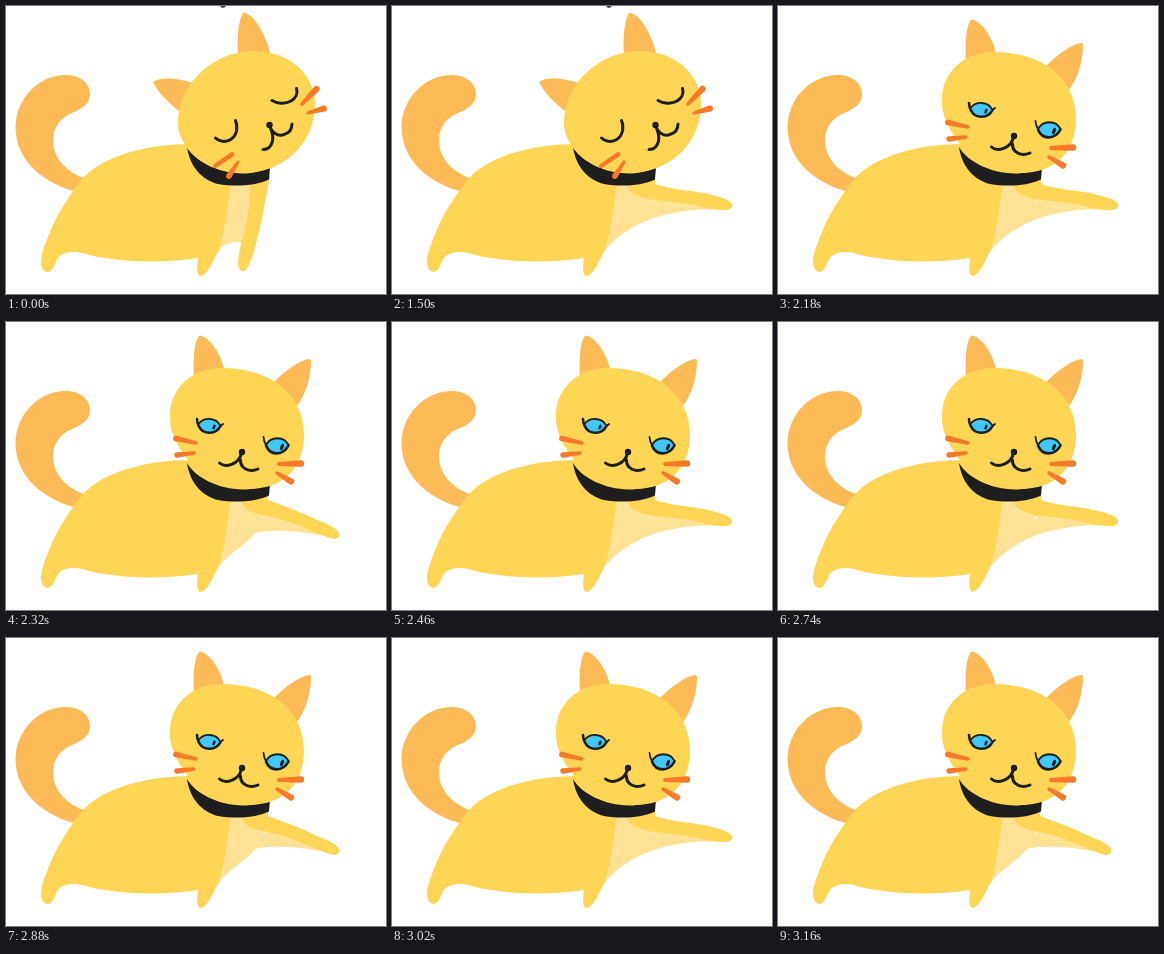
These frames come from a looping animation (380 by 288 pixels, 3.3 s). An HTML page:

```html
<!DOCTYPE html>
<html lang="en">
<head>
<meta charset="utf-8">
<title>Cat waking up</title>
<style>
  html, body { margin: 0; width: 100%; height: 100%; overflow: hidden; background: #fff; }
  svg { display: block; width: 380px; height: 288px; }
  .fur { fill: #ffd556; }
  .ear { fill: #fdbb58; }
  .chest { fill: #ffe296; }
  .ink { fill: #1e1e1e; }
  .line { fill: none; stroke: #1e1e1e; stroke-width: 3; stroke-linecap: round; stroke-linejoin: round; }
  .lid { stroke-width: 1.8; }
  .rim { stroke-width: 2.6; }
  .iris { fill: #3fc8f8; }
  .whisker { fill: #f47a2a; }
  .pose { opacity: 0; }
</style>
</head>
<body>
<svg viewBox="0 0 380 288" xmlns="http://www.w3.org/2000/svg">
  <path class="ear" d="M72 186C40 179 9.5 156 9.5 121C10 92 33 69 60 69C75 69 84 78 84 88C84 98 76 103 66 107C54 112 47 122 47 134C47 152 60 166 80 173Z"/>
  <path class="fur" d="M184 138C148 138.500 102 146 77 172C66 185 52 207 46 221C39 238 35 248 35 256C35 262 38 266 42 266C47 265 49 257 52 252C57 246 66 245 76 247C105 256 155 258 192 252C191 258 190 268 194 270C202 270 208 252 213 244L232 205L262 170V150Z"/>

  <g id="stand" class="pose">
    <path class="chest" d="M225 176C222 196 220 219 212.500 245C217 238 230 233 236 238L250 176Z"/>
    <path class="fur" d="M244 176C244 200 241 219 235 238C233 247 231 257 233 262C235 267 239 266 242 261C250 246 257 208 264 170Z"/>
  </g>
  <g id="high" class="pose">
    <path class="chest" d="M225 176C222 196 220 222 212.500 245C228 226 250 214 276 208C294 204 310 203 330 203L262 180Z"/>
    <path class="fur" d="M235 176C236 186 242 189 256 193C276 196 294 196 314 202C322 204 330 204 335 204C339 203 341 201 340 198C338 193 324 190 312 187C294 184 277 183 263 178V170Z"/>
    <circle cx="258" cy="195.500" r="1" fill="#fff"/>
  </g>
  <g id="low" class="pose">
    <path class="chest" d="M225 176C222 196 220 222 212.500 245C224 230 239 224 249 211C262 207 296 208 323 215L262 180Z"/>
    <path class="fur" d="M235 176C236 186 242 190 256 193C276 196 291 203 306 209C314 212 322 216 328 217C332 217 334 214 333 211C331 206 321 202 311 198C295 190 278 184 262 178V170Z"/>
    <circle cx="258" cy="195.500" r="1" fill="#fff"/>
  </g>

  <path class="ink" d="M181 141C184 161 196 174 212 178C229 181 249 180 263 173.500L264 161.500C256 165 247 167.500 237 167.500C212 167 190 156 181 141Z"/>

  <g id="asleep" class="pose">
    <path d="M214 0H220Q219 2 216 2Z" fill="#444"/>
    <path class="ear" d="M147 76C155 70 172 72 191 78L173 105C163 97 152 87 147 76Z"/>
    <path class="ear" d="M237 7C232 15 231 32 232 50L264 47C261 32 250 11 241 8Q238 6 237 7Z"/>
    <path class="fur" d="M172 117C172 75 210 45 248 45C285 45 309 70 309 98C309 140 275 167 237 167C200 167 172 143 172 117Z"/>
    <path class="line" d="M209.500 132C216 138 228 136 230.500 125Q231.500 119 229.500 114.500M266 94.500C271 97.500 279 98.500 285 95C290 92 292 87 290.500 82.500"/>
    <path class="line" d="M264 120C265 126 272 131 278 128.500C283 127 286 123 286 118M264.500 122C267 128 268 134 265 139C263 142.500 260 143.500 257 143.500"/>
    <circle class="ink" cx="263.500" cy="119" r="3.200"/>
  </g>

  <g id="awake" class="pose">
    <path class="ear" d="M193 14C188 20 187 38 188 55L218 47C215 32 205 18 197 14.500Q194 13 193 14Z"/>
    <path class="ear" d="M304 37C293 38 278 50 268 60L291 84C299 74 305 55 305 40Q305 37 304 37Z"/>
    <path class="fur" d="M164 92C165 64 188 46 215 46C266 46 298 73 298 113C298 148 275 167 243 167C215 167 190 152 177 131C168 118 163 105 164 92Z"/>
    <path class="iris" d="M193 104C197 95 210 95 214.500 104C210 114 197 114 193 104Z"/>
    <path class="line lid" d="M192.500 102C198 95 210 95 214.500 104L217 102"/>
    <path class="line rim" d="M191 97Q191 101 193 104.500C197 113 210 113 214.500 104"/>
    <path class="iris" d="M260 123C265 114 278 114 282.500 123C277 134 264 134 260 123Z"/>
    <path class="line lid" d="M257.500 115Q258 120 260 123C265 114 278 114 282.500 123"/>
    <path class="line rim" d="M260 123.500C264 134 277 134 282.500 123.500"/>
    <ellipse class="ink" cx="208" cy="105" rx="1.400" ry="2.700" transform="rotate(20 208 105)"/>
    <ellipse class="ink" cx="276" cy="125" rx="1.700" ry="3.400" transform="rotate(20 276 125)"/>
    <path class="line" d="M213.500 141C219 146 233 143 235.500 131M234.500 138C234 146 243 151 252 147"/>
    <circle class="ink" cx="236" cy="130" r="3.200"/>
  </g>
</svg>
<script>
  const LOOP = 3300;
  const BEAT = 140;
  const WAKE = 2180;
  const $ = id => document.getElementById(id);

  // Tapered stroke with round ends: inner point, outer point, two radii.
  function whisker(head, x1, y1, x2, y2, r1, r2) {
    const a = Math.atan2(y2 - y1, x2 - x1);
    const s = Math.sin(a), c = Math.cos(a);
    const at = (x, y, r) => `${x - s * r} ${y + c * r}`;
    const path = document.createElementNS("http://www.w3.org/2000/svg", "path");
    path.setAttribute("class", "whisker");
    path.setAttribute("d",
      `M${at(x1, y1, r1)}L${at(x2, y2, r2)}A${r2} ${r2} 0 0 0 ${at(x2, y2, -r2)}` +
      `L${at(x1, y1, -r1)}A${r1} ${r1} 0 0 0 ${at(x1, y1, r1)}Z`);
    $(head).append(path);
  }

  whisker("asleep", 296, 98, 310.5, 83, 1.8, 3.2);
  whisker("asleep", 302, 107, 318, 102.5, 1.6, 3);
  whisker("asleep", 226, 148.5, 209, 160, 2.3, 2);
  whisker("asleep", 232, 156, 223, 170, 1.6, 2.9);
  whisker("awake", 190, 121, 170, 116.5, 1.7, 2.9);
  whisker("awake", 188, 131, 171, 133, 1.7, 2.7);
  whisker("awake", 273, 142, 295, 141.5, 1.9, 3.2);
  whisker("awake", 271, 151, 285, 159.5, 1.7, 3.1);

  // Steps are [time, visible]; each holds until the next.
  function show(id, steps) {
    const frames = steps.map(([t, on]) => ({ offset: t / LOOP, opacity: on, easing: "step-end" }));
    frames.push({ offset: 1, opacity: steps.at(-1)[1] });
    $(id).animate(frames, { duration: LOOP, iterations: Infinity });
  }

  const pats = Array.from({ length: 8 }, (_, i) => [WAKE + i * BEAT, i % 2]);
  show("asleep", [[0, 1], [WAKE, 0]]);
  show("awake", [[0, 0], [WAKE, 1]]);
  show("stand", [[0, 1], [1500, 0]]);
  show("high", [[0, 0], [1500, 1], ...pats.map(([t, low]) => [t, 1 - low])]);
  show("low", [[0, 0], ...pats]);
</script>
</body>
</html>
```
